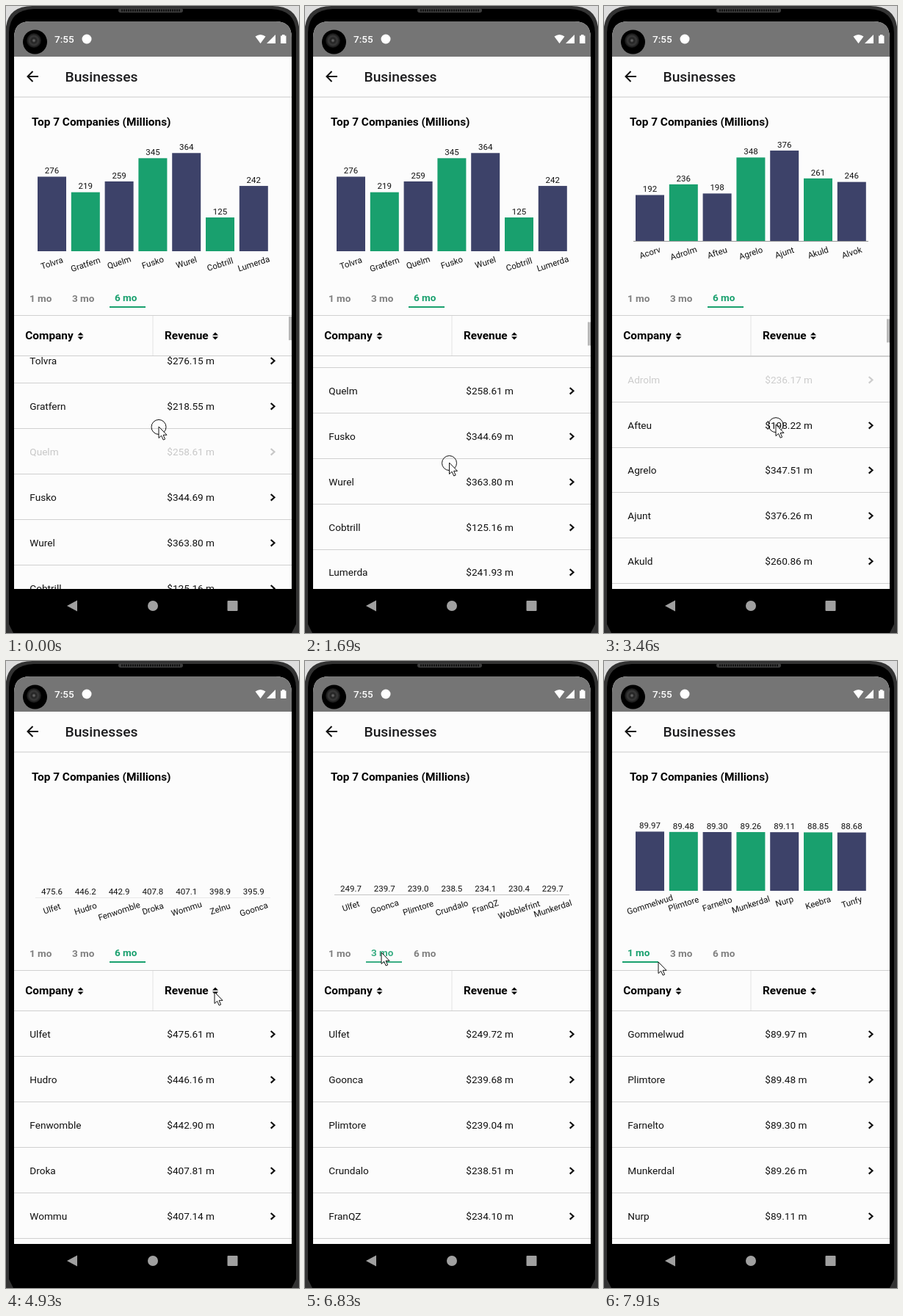
An HTML page that plays this animation: 399 px wide and 854 px high, repeating every 8 s.

```html
<!DOCTYPE html>
<html lang="en">
<head>
<meta charset="utf-8">
<title>Businesses</title>
<style>
html, body { margin: 0; width: 100%; height: 100%; overflow: hidden; background: #ddd; }
svg { display: block; width: 399px; height: 854px; font-family: Roboto, sans-serif; }
.row text { font-size: 13.6px; fill: #111; }
.chart text { font-size: 11.5px; fill: #111; text-anchor: middle; }
.bold { font-size: 15.4px; font-weight: 700; }
.tab { font-size: 13.5px; font-weight: 700; }
</style>
</head>
<body>
<svg id="stage" viewBox="0 0 399 854">
  <defs>
    <clipPath id="listClip"><rect x="11" y="477" width="378" height="317"/></clipPath>
    <radialGradient id="lens">
      <stop offset="0" stop-color="#777"/><stop offset=".3" stop-color="#222"/>
      <stop offset=".6" stop-color="#3a3a3a"/><stop offset="1" stop-color="#111"/>
    </radialGradient>
  </defs>
  <path d="M0 854V28Q4 0 36 0H363Q395 0 399 28V854Z" fill="#333"/>
  <path d="M4 842V36Q5 5 38 4H361Q394 5 395 36V842L389 854H10Z"/>
  <rect x="153" y="3" width="88" height="6" rx="3" fill="#3c3c3c"/>
  <path d="M157 6H237" stroke="#111" stroke-width="3" stroke-dasharray="2 1"/>
  <path d="M11 794V43Q11 21 33 21H367Q389 21 389 43V794Z" fill="#fcfcfc"/>
  <path d="M11 69V43Q11 21 33 21H367Q389 21 389 43V69Z" fill="#757575"/>
  <circle cx="39.500" cy="49" r="16.500"/>
  <circle cx="38" cy="47" r="10" fill="url(#lens)"/>
  <text x="66" y="50" font-size="13.500" font-weight="500" fill="#fff">7:55</text>
  <circle cx="110" cy="45" r="6.500" fill="#fff"/>
  <g fill="#fff">
    <path d="M339.500 41.500Q346.500 36.500 353.500 41.500L346.500 51Z"/>
    <path d="M367 39V51H355Z"/>
    <path d="M374 40.500H376V39H379.500V40.500H381.500V51H374Z"/>
  </g>
  <path d="M11 124H389" stroke="#e3e3e3" stroke-width="2"/>
  <path d="M44 96H30M36.500 89L29.500 96L36.500 103" fill="none" stroke="#111" stroke-width="2"/>
  <text x="80.500" y="103.200" font-size="19.250" font-weight="500" fill="#1c1c1e">Businesses</text>
  <text class="bold" x="35" y="163">Top 7 Companies (Millions)</text>
  <g id="chart" class="chart"></g>
  <g id="tabs"></g>
  <g id="list" clip-path="url(#listClip)"></g>
  <path d="M11 421.500H389M11 476.500H389" stroke="#d0d0d0"/>
  <path d="M200 422V476" stroke="#e2e2e2"/>
  <g id="heads"></g>
  <rect id="bar" x="385" y="421" width="4" height="32" fill="#b9b9b9"/>
  <g fill="#a0a0a0">
    <path d="M97 809.500V824.500L83 817Z"/>
    <circle cx="200" cy="817" r="7"/>
    <rect x="301.500" y="810" width="14" height="14" rx="1"/>
  </g>
  <g id="pointer">
    <circle id="touch" cy=".5" r="10" fill="none" stroke="#111"/>
    <path d="M0 0V15.500L3.600 12.200L6.200 18L8.600 17L6.100 11.300H11Z" fill="#fff" stroke="#111"/>
  </g>
</svg>
<script>
const LOOP = 8000, PITCH = 61.9, GROW = 400;
const GREEN = '#19a06e', NAVY = '#3d4269';
const $ = id => document.getElementById(id);

function add(parent, tag, attrs, text) {
  const el = document.createElementNS('http://www.w3.org/2000/svg', tag);
  for (const k in attrs) el.setAttribute(k, attrs[k]);
  if (text !== undefined) el.textContent = text;
  parent.appendChild(el);
  return el;
}
const set = (el, k, v) => el.setAttribute(k, v);

// Linear interpolation through keys of the form [time, ...values].
function track(keys, t) {
  if (t <= keys[0][0]) return keys[0].slice(1);
  for (let i = 1; i < keys.length; i++) {
    const a = keys[i - 1], b = keys[i];
    if (t <= b[0]) {
      const u = (t - a[0]) / (b[0] - a[0]);
      return a.slice(1).map((v, j) => v + (b[j + 1] - v) * u);
    }
  }
  return keys[keys.length - 1].slice(1);
}

// Each view: start time, axis position, pixels per unit, label decimals, axis colour, rows.
const views = [
  { at: -1000, base: 334, scale: .3676, digits: 0, axis: 'none',
    rows: 'Tolvra 276.15,Gratfern 218.55,Quelm 258.61,Fusko 344.69,Wurel 363.80,Cobtrill 125.16,Lumerda 241.93,Perwint 187.42,Dolvask 302.77' },
  { at: 2740, base: 320.5, scale: .3285, digits: 0, axis: '#999',
    rows: 'Acorv 191.87,Adrolm 236.17,Afteu 198.22,Agrelo 347.51,Ajunt 376.26,Akuld 260.86,Alvok 246.08' },
  { at: 4930, base: 322, scale: .271, digits: 1, axis: '#e9e9e9',
    rows: 'Ulfet 475.61,Hudro 446.16,Fenwomble 442.90,Droka 407.81,Wommu 407.14,Zelnu 398.92,Goonca 395.91' },
  { at: 6830, base: 318.5, scale: .5046, digits: 1, axis: '#c4c4c4',
    rows: 'Ulfet 249.72,Goonca 239.68,Plimtore 239.04,Crundalo 238.51,FranQZ 234.10,Wobblefrint 230.43,Munkerdal 229.71' },
  { at: 7770, base: 313, scale: 1.356, digits: 2, axis: 'none',
    rows: 'Gommelwud 89.97,Plimtore 89.48,Farnelto 89.30,Munkerdal 89.26,Nurp 89.11,Keebra 88.85,Tunfy 88.68' }
];

for (const v of views) {
  v.chart = add($('chart'), 'g', {});
  v.list = add($('list'), 'g', {});
  v.cols = [];
  v.lines = v.rows.split(',').map((entry, i) => {
    const [name, amount] = entry.split(' ');
    const g = add(v.list, 'g', { class: 'row' });
    add(g, 'path', { d: 'M11 0H389', stroke: '#d0d0d0' });
    const body = add(g, 'g', {});
    add(body, 'text', { x: 32.3, y: -25.3 }, name);
    add(body, 'text', { x: 219.3, y: -25.3 }, '$' + amount + ' m');
    add(body, 'path', { d: 'M360.7 -34.500L365.500 -30.200L360.7 -25.900', fill: 'none', stroke: '#111', 'stroke-width': 2.2 });
    if (i < 7) {
      const x = 62.5 + 45.8 * i, value = +amount;
      const rect = add(v.chart, 'rect', { x: x - 19.5, width: 39, fill: i % 2 ? GREEN : NAVY });
      const label = add(v.chart, 'text', { x }, value.toFixed(v.digits));
      const y = v.base + 11 + name.length * .86;
      add(v.chart, 'text', { transform: `translate(${x} ${y}) rotate(-18)`, y: 4 }, name);
      v.cols.push({ value, rect, label });
    }
    return { g, body };
  });
  add(v.chart, 'path', { d: `M40 ${Math.floor(v.base) + .5}H360`, stroke: v.axis });
}

const tabs = ['1 mo', '3 mo', '6 mo'].map((name, i) => {
  const g = add($('tabs'), 'g', {}), left = 25 + 58 * i;
  const text = add(g, 'text', { class: 'tab', x: left + 7 }, name);
  const line = add(g, 'rect', { x: left, y: 409, width: 49, height: 2, fill: GREEN });
  return { g, text, line };
});

const heads = [['Company', 26.3, 101.5], ['Revenue', 216, 285]].map(([name, x, icon]) => {
  const g = add($('heads'), 'g', {});
  add(g, 'text', { class: 'bold', x, y: 454.3 }, name);
  add(g, 'path', { d: `M${icon - 4} 448.500l4 -4l4 4zM${icon - 4} 450.500l4 4l4 -4z` });
  return g;
});

const scrollKeys = [[0, 24.8], [150, 30], [900, 136], [1020, 200], [1140, 236], [1290, 240],
  [1700, 105], [1900, 72], [3200, 72], [3460, 61.4], [3590, 38], [3850, 0]];
const moveKeys = [[0, 208, 573], [150, 209, 567], [900, 224, 500], [1020, 226, 416], [1140, 222, 470],
  [1290, 220, 490], [1700, 196, 625], [1850, 180, 610], [2290, 101, 451], [2440, 101, 451],
  [2740, 155, 503], [3200, 226, 540], [3460, 234, 570], [3590, 236, 594], [3850, 240, 632],
  [4000, 246, 610], [4490, 284, 451]];
const lateKeys = [[6960, 104, 397], [7360, 74, 410]];
const barKeys = [[0, 1], [1950, 1], [2250, 0], [3190, 0], [3260, 1], [4100, 1], [4400, 0]];
const touches = [[0, 1080], [1290, 1800], [3200, 3850]];

function pointerAt(t) {
  if (t < 5500) return track(moveKeys, t);
  if (t >= 6520) return track(lateKeys, t);
  const u = (t - 5500) / 1020, w = 1 - u;
  const arc = (a, b, c) => w * w * a + 2 * u * w * b + u * u * c;
  return [arc(284, 195, 104), arc(451, 222, 397)];
}

function render(t) {
  const current = views.filter(v => t >= v.at).pop();
  const [scroll] = track(scrollKeys, t);

  for (const v of views) {
    const show = v === current ? 'inline' : 'none';
    set(v.chart, 'display', show);
    set(v.list, 'display', show);
  }
  const u = Math.min(1, Math.max(0, (t - current.at - 20) / GROW));
  const grown = 1 - (1 - u) ** 3;
  for (const c of current.cols) {
    const h = c.value * current.scale * grown;
    set(c.rect, 'y', current.base - h);
    set(c.rect, 'height', h);
    set(c.label, 'y', current.base - h - 4.3);
  }

  current.lines.forEach((line, i) => {
    const y = Math.floor(538.5 + PITCH * i - scroll) + .5;
    set(line.g, 'transform', `translate(0 ${y})`);
    let fade = 1;
    if (current === views[0] && i === 2) [fade] = track([[0, .22], [150, .3], [400, 1]], t);
    if (current === views[1] && i === 1) [fade] = track([[3200, 1], [3330, .2], [3500, .2], [3750, 1]], t);
    set(line.body, 'opacity', fade);
  });

  const active = t < 6700 ? 2 : t < 7640 ? 1 : 0;
  const fades = [
    track([[7340, 1], [7360, .25], [7640, .4], [7800, 1]], t)[0],
    track([[6560, 1], [6580, .25], [6700, .45], [6830, .85], [6950, 1]], t)[0], 1];
  tabs.forEach((tab, i) => {
    const on = i === active;
    set(tab.text, 'fill', on ? GREEN : '#808080');
    set(tab.text, 'y', on ? 401.8 : 402.8);
    set(tab.line, 'display', on ? 'inline' : 'none');
    set(tab.g, 'opacity', fades[i]);
  });

  set(heads[0], 'opacity', t >= 2440 && t < 2740 ? .25 : 1);
  set(heads[1], 'opacity', t >= 4640 && t < 4930 ? .25 : 1);

  set($('bar'), 'y', 421 + scroll * .088);
  set($('bar'), 'opacity', track(barKeys, t)[0]);

  const [x, y] = pointerAt(t);
  set($('pointer'), 'transform', `translate(${x} ${y})`);
  set($('touch'), 'display', touches.some(([a, b]) => t >= a && t < b) ? 'inline' : 'none');
}

const start = performance.now();
function frame() {
  render((performance.now() - start) % LOOP);
  requestAnimationFrame(frame);
}
frame();
</script>
</body>
</html>
```
